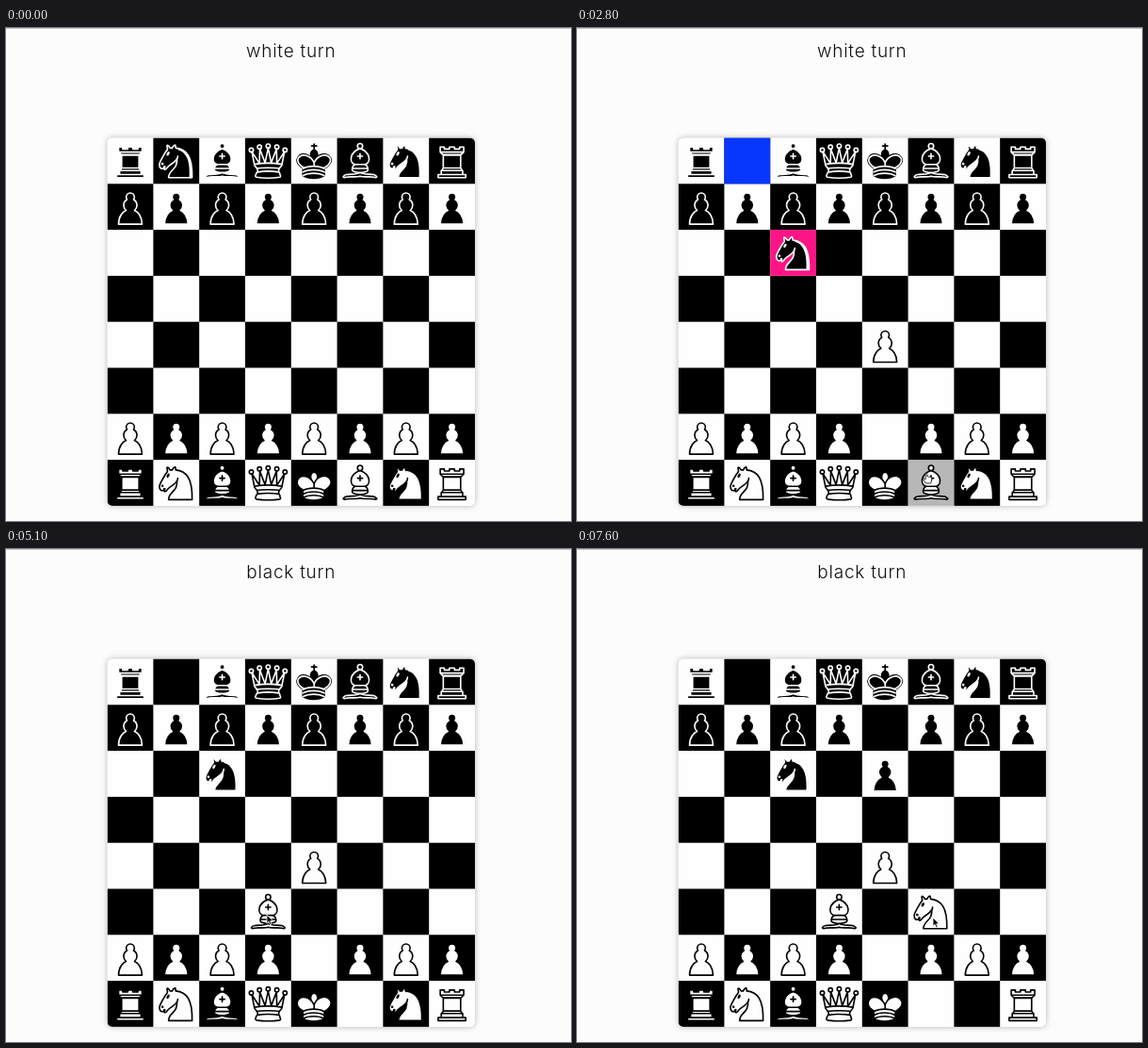
Animation, 600 px wide and 523 px high, one loop 8000 ms. Source, as an HTML page:

```html
<!DOCTYPE html>
<html lang="en">
<head>
<meta charset="utf-8">
<title>Chess</title>
<style>
  html, body { margin: 0; width: 100%; height: 100%; overflow: hidden; background: #fcfcfc; }
  svg { display: block; }
  #turn { font: 300 19px Inter, sans-serif; letter-spacing: .75px; text-anchor: middle; fill: #111; }
  .piece { stroke-width: 1.5; stroke-linecap: round; stroke-linejoin: round; }
  .white { fill: #fefefe; stroke: #000; }
  .black { fill: #000; stroke: #fefefe; }
  #frame { fill: #fefefe; filter: drop-shadow(0 0 3px rgba(0, 0, 0, .28)); }
</style>
</head>
<body>
<svg width="600" height="523" viewBox="0 0 600 523">
  <defs>
    <clipPath id="round"><rect width="360" height="360" rx="5"/></clipPath>
    <g id="p">
      <path d="M22.5 9c-2.21 0-4 1.79-4 4 0 .89.29 1.71.78 2.38C17.33 16.5 16 18.59 16 21c0 2.03.94 3.84 2.41 5.03-3 1.06-7.41 5.55-7.41 13.47h23c0-7.92-4.41-12.41-7.41-13.47 1.47-1.19 2.41-3 2.41-5.03 0-2.41-1.33-4.5-3.28-5.62.49-.67.78-1.49.78-2.38 0-2.21-1.79-4-4-4z"/>
    </g>
    <g id="r">
      <path d="M9 39h27v-3H9zM12 36v-4h21v4zM14 29.5v-13h17v13zM12.5 32l1.5-2.5h17l1.5 2.5zM14 17l-3-3h23l-3 3zM11 14V9h4v2h5V9h5v2h5V9h4v5z"/>
    </g>
    <g id="n">
      <path d="M22 10c10.5 1 16.5 8 16 29H15c0-9 10-6.5 8-21"/>
      <path d="M24 18c.38 2.91-5.55 7.37-8 9-3 2-2.82 4.34-5 4-1.04-.94 1.41-3.04 0-3-1 0 .19 1.23-1 2-1 0-4 1-4-4 0-2 6-12 6-12s1.89-1.9 2-3.5c-.73-1-.5-2-.5-3 1-1 3 2.5 3 2.5h2s.78-2 2.5-3c1 0 1 3 1 3"/>
      <circle cx="9" cy="25.5" r=".5"/>
      <ellipse cx="14.5" cy="15.5" rx=".5" ry="1.5" transform="rotate(30 14.5 15.5)"/>
    </g>
    <path id="mane" fill="#fefefe" stroke="none" d="M24.55 10.4l-.45 1.45.5.15c3.15 1 5.65 2.49 7.9 6.75S35.75 29.06 35.25 39l-.05.5h2.25l.05-.5c.5-10.06-.88-16.85-3.25-21.34s-5.79-6.64-9.19-7.16z"/>
    <g id="b">
      <path d="M9 36c3.39-.97 10.11.43 13.5-2 3.39 2.43 10.11 1.03 13.5 2 0 0 1.65.54 3 2-.68.97-1.65.99-3 .5-3.39-.97-10.11.46-13.5-1-3.39 1.46-10.11.03-13.5 1-1.35.49-2.32.47-3-.5 1.35-1.94 3-2 3-2z"/>
      <path d="M15 32c2.5 2.5 12.5 2.5 15 0 .5-1.5 0-2 0-2 0-2.5-2.5-4-2.5-4 5.5-1.5 6-11.5-5-15.5-11 4-10.5 14-5 15.5 0 0-2.5 1.5-2.5 4 0 0-.5.5 0 2z"/>
      <circle cx="22.5" cy="8" r="2.5"/>
      <path fill="none" d="M17.5 26h10M15 30h15m-7.5-14.5v5M20 18h5"/>
    </g>
    <g id="q">
      <circle cx="6" cy="12" r="2"/><circle cx="14" cy="9" r="2"/><circle cx="22.5" cy="8" r="2"/>
      <circle cx="31" cy="9" r="2"/><circle cx="39" cy="12" r="2"/>
      <path d="M9 26c8.5-1.5 21-1.5 27 0l2.5-12.5L31 25l-.3-14.1-5.2 13.6-3-14.5-3 14.5-5.2-13.6L14 25 6.5 13.5z"/>
      <path d="M9 26c0 2 1.5 2 2.5 4 1 1.5 1 1 .5 3.5-1.5 1-1.5 2.5-1.5 2.5-1.5 1.5.5 2.5.5 2.5 6.5 1 16.5 1 23 0 0 0 1.5-1 0-2.5 0 0 .5-1.5-1-2.5-.5-2.5-.5-2 .5-3.5 1-2 2.5-2 2.5-4-8.5-1.5-18.5-1.5-27 0z"/>
      <path fill="none" d="M11.5 30c3.5-1 18.5-1 22 0M12 33.5c6-1 15-1 21 0"/>
    </g>
    <g id="k" stroke="#000">
      <path fill="none" d="M22.5 11.63V6M20 8h5"/>
      <path d="M22.5 25s4.5-7.5 3-10.5c0 0-1-2.5-3-2.5s-3 2.5-3 2.5c-1.5 3 3 10.5 3 10.5"/>
      <path d="M11.5 37c5.5 3.5 15.5 3.5 21 0v-7s9-4.5 6-10.5c-4-6.5-13.5-3.5-16 4V27v-3.5c-3.5-7.5-13-10.5-16-4-3 6 5 10 5 10z"/>
    </g>
    <path id="bands" fill="none" d="M11.5 30c5.5-3 15.5-3 21 0m-21 3.5c5.5-3 15.5-3 21 0m-21 3.5c5.5-3 15.5-3 21 0"/>
    <path id="lobes" fill="none" d="M32 29.5s8.5-4 6.03-9.65C34.15 14 25 18 22.5 24.5v2.1-2.1C20 18 10.85 14 6.97 19.85 4.5 25.5 13 29.5 13 29.5"/>
  </defs>
  <rect width="600" height="1" fill="#c4c4c4"/>
  <text id="turn" x="302.8" y="31"></text>
  <g transform="translate(107.6 116.5) scale(1.0844)">
    <rect id="frame" width="360" height="360" rx="5"/>
    <g id="cells" clip-path="url(#round)"></g>
    <g id="pieces"></g>
  </g>
  <g id="cursor" stroke-linejoin="round">
    <path id="arrow" d="M0 0v9.2l2.1-1.9 1.5 3.4 1.6-.7-1.5-3.3h2.9z" fill="#000" stroke="#fff" stroke-width=".8"/>
    <path id="hand" d="M-.9 .7q.9-1.3 1.8 0V4q.9-.8 1.7.2.9-.7 1.6.3 1-.5 1.5.6V8L4.6 11H-.4L-3.4 6.9q-.2-1.5 1.2-1L-.9 7z" fill="#fff" stroke="#000" stroke-width=".8"/>
  </g>
</svg>
<script>
const LOOP = 8000, FADE = 200;
const PINK = '#ff1485', BLUE = '#0837ff', GRAY = '#808080';
const $ = id => document.getElementById(id);

// squares are named like "e4"
const place = sq => [(sq.charCodeAt(0) - 97) * 45, (8 - sq[1]) * 45];

function add(parent, tag, attrs) {
  const el = document.createElementNS('http://www.w3.org/2000/svg', tag);
  for (const key in attrs) el.setAttribute(key, attrs[key]);
  return parent.appendChild(el);
}

function cell(sq, fill) {
  const [x, y] = place(sq);
  return add($('cells'), 'rect', { x, y, width: 45, height: 45, fill });
}

// time, from, to
const moves = [
  [1150, 'e2', 'e4'], [2000, 'b8', 'c6'], [4850, 'f1', 'd3'],
  [5900, 'e7', 'e6'], [7150, 'g1', 'f3']
];

// squares, colour, fade-in start, fade-out start
const glows = [
  ['e2', GRAY, 350, 700], ['e3 e4', PINK, 420, 1150],
  ['b8', BLUE, 2000, 2850], ['c6', PINK, 2000, 2850],
  ['f1', GRAY, 2690, 3650], ['e2 d3 c4 b5 a6', PINK, 2850, 4850],
  ['e7', BLUE, 5900, 6600], ['e6', PINK, 5900, 6600],
  ['g1', GRAY, 6540, 6870], ['e2 f3 h3', PINK, 6600, 7150]
];

// start, end, target x, target y
const path = [
  [100, 200, 336, 434], [650, 1000, 326, 320], [2250, 2760, 371, 472],
  [3600, 4050, 277, 388], [6080, 6600, 428, 489], [6820, 7100, 378, 391]
];

// spans in which the pointer is a hand
const handSpans = [[350, 1150], [2690, 4850], [6540, 7150]];

const files = [...'abcdefgh'];
files.forEach((file, i) => {
  for (let rank = 1; rank <= 8; rank++) {
    if ((i + rank) % 2) cell(file + rank, '#000');
  }
});

const lights = glows.flatMap(([squares, fill, start, end]) =>
  squares.split(' ').map(sq => ({ el: cell(sq, fill), start, end })));

const pieces = [];
function addPiece(kind, side, sq) {
  const el = add($('pieces'), 'g', { class: 'piece ' + side });
  const parts = [kind];
  if (kind === 'n' && side === 'black') parts.push('mane');
  if (kind === 'k') parts.push('bands');
  if (kind === 'k' && side === 'black') parts.push('lobes');
  parts.forEach(id => add(el, 'use', { href: '#' + id }));
  pieces.push({ el, home: sq });
}
files.forEach((file, i) => {
  addPiece('rnbqkbnr'[i], 'black', file + 8);
  addPiece('p', 'black', file + 7);
  addPiece('p', 'white', file + 2);
  addPiece('rnbqkbnr'[i], 'white', file + 1);
});

const ramp = (t, start, span) => Math.min(1, Math.max(0, (t - start) / span));

function cursorAt(t) {
  let x = 336, y = 450;
  for (const [start, end, tx, ty] of path) {
    const k = ramp(t, start, end - start), e = k * k * (3 - 2 * k);
    x += (tx - x) * e;
    y += (ty - y) * e;
  }
  return [x, y];
}

function draw(t) {
  const done = moves.filter(m => t >= m[0]);
  $('turn').textContent = (done.length % 2 ? 'black' : 'white') + ' turn';

  for (const { el, home } of pieces) {
    const move = done.find(m => m[1] === home);
    el.setAttribute('transform', `translate(${place(move ? move[2] : home)})`);
  }
  for (const { el, start, end } of lights) {
    el.setAttribute('opacity', ramp(t, start, FADE) - ramp(t, end, FADE));
  }

  const hand = handSpans.some(([a, b]) => t >= a && t < b);
  $('hand').style.display = hand ? '' : 'none';
  $('arrow').style.display = hand ? 'none' : '';
  $('cursor').style.display = t < 100 ? 'none' : '';
  $('cursor').setAttribute('transform', `translate(${cursorAt(t)})`);
}

const begin = performance.now();
function tick() {
  draw((performance.now() - begin) % LOOP);
  requestAnimationFrame(tick);
}
tick();
</script>
</body>
</html>
```
